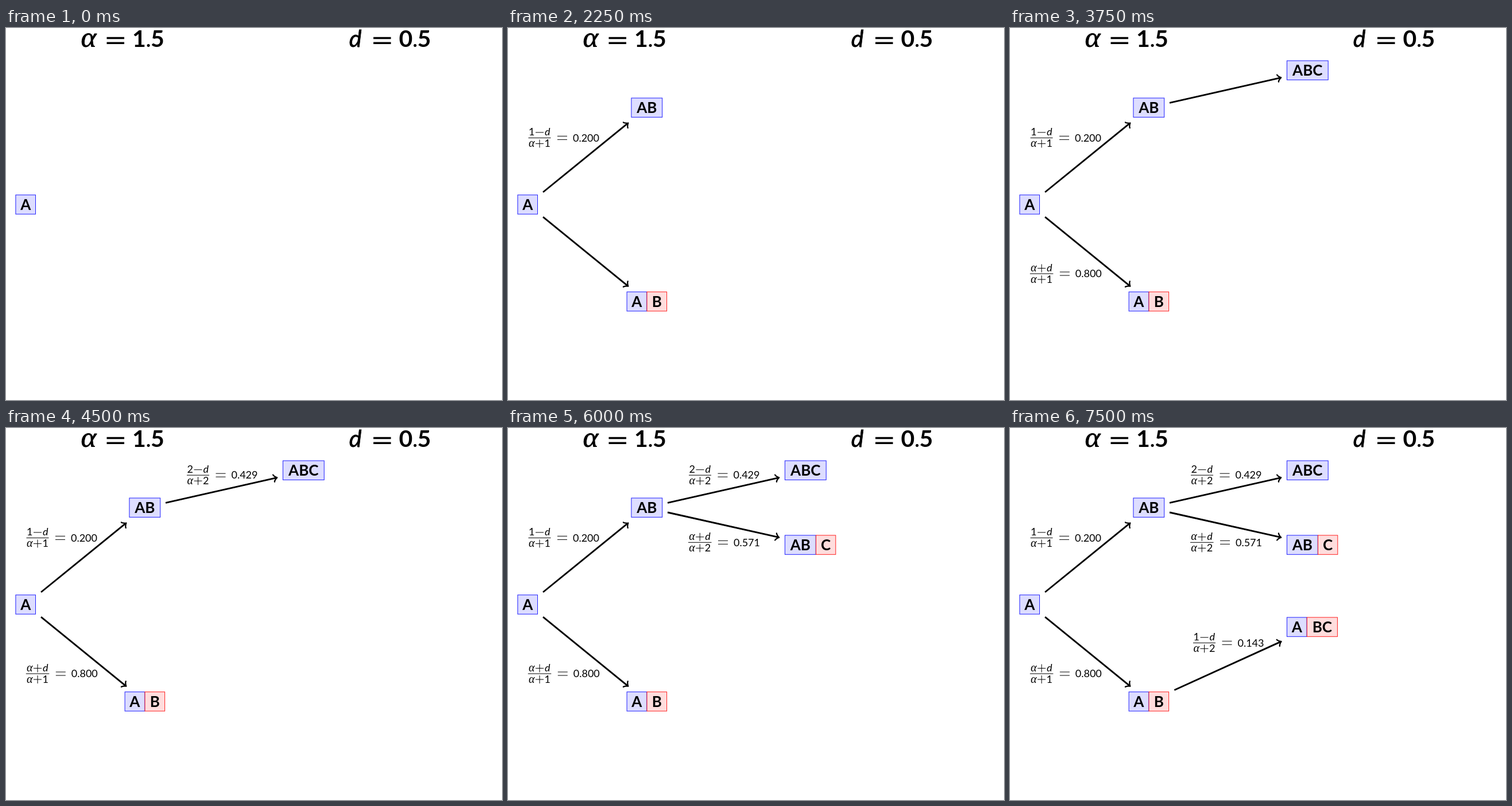
An HTML page that plays this animation: 864 by 648 pixels, repeating every 8000 ms.

```html
<!DOCTYPE html>
<html lang="en">
<head>
<meta charset="utf-8">
<title>Partition tree</title>
<style>
  html, body { margin: 0; width: 100%; height: 100%; overflow: hidden; background: #fff; }
  svg { display: block; width: 100vw; height: 100vh; }
  text { font-family: Lato, sans-serif; text-anchor: middle; font-kerning: none; }
  .title { font-size: 41px; }
  .node { font-size: 26px; }
  .label { font-size: 18px; }
  .bold { font-weight: 700; }
  .d { font-style: italic; }
  .alpha { font-family: "Liberation Serif", serif; font-style: italic; }
  .title.alpha { font-size: 51px; }
  .title.alpha, .title.d { stroke: #000; stroke-width: 0.8px; }
  .label.alpha { font-size: 20px; }
  .line { fill: none; stroke: #000; }
</style>
</head>
<body>
<svg id="stage" viewBox="0 0 864 648"></svg>
<script>
const LOOP = 8000, STEP = 750;
const BLUE = ["#ddddff", "#2020ff"], RED = ["#ffdddd", "#ff2020"];
const LETTER_BOX = { A: 34.6, B: 34.6, C: 34.3, AB: 53.8, BC: 53.1, ABC: 71.8 };
const stage = document.getElementById("stage");

function add(parent, tag, attrs, content = "") {
  const el = document.createElementNS("http://www.w3.org/2000/svg", tag);
  for (const key in attrs) el.setAttribute(key, attrs[key]);
  el.textContent = content;
  parent.append(el);
  return el;
}

const write = (g, x, y, string, style) => add(g, "text", { x, y, class: style }, string);
const stroke = (g, d, width) => add(g, "path", { d, class: "line", "stroke-width": width });

function symbol(g, x, y, char, style) {
  const extra = { "α": " alpha", d: " d" }[char] || "";
  write(g, x, y, char, style + extra);
}

function title(g, x, eq, char, digits) {
  symbol(g, x, 33, char, "title");
  stroke(g, `M${eq} 17.5h30.5M${eq} 26.3h30.5`, 3.6);
  const first = eq + 56.5;
  write(g, first, 33.3, digits[0], "title bold");
  write(g, first + 16, 33.3, ".", "title");
  write(g, first + 32, 33.3, digits[1], "title bold");
}

// Boxes sit side by side from x; the first is blue, the second red.
function node(g, x, cy, ...words) {
  words.forEach((word, i) => {
    const [fill, edge] = i ? RED : BLUE, width = LETTER_BOX[word];
    add(g, "rect", { x, y: cy - 16.7, width, height: 33.4, fill, stroke: edge, "stroke-width": 1 });
    write(g, x + width / 2, cy + 9.5, word, "node bold");
    x += width + 0.3;
  });
}

function arrow(g, x1, y1, x2, y2) {
  const a = 1.55, length = Math.hypot(x2 - x1, y2 - y1);
  const angle = Math.atan2(y2 - y1, x2 - x1) * 180 / Math.PI;
  const shaft = add(g, "g", { transform: `translate(${x1} ${y1}) rotate(${angle})` });
  stroke(shaft, `M0 0H${length - a}`, 2.85);
  const head = add(shaft, "g", { transform: `translate(${length - 2} 0) scale(${a})` });
  add(head, "path", {
    d: "M-3 -4C-2.75 -2.5 0 -.25 .75 0C0 .25 -2.75 2.5 -3 4",
    class: "line", "stroke-width": 1.5, "stroke-linecap": "round", "stroke-linejoin": "round"
  });
}

function row(g, cx, y, [left, sign, right]) {
  symbol(g, cx - 13.7, y, left, "label");
  stroke(g, `M${cx - 7} ${y - 5.5}h14` + (sign === "+" ? `M${cx} ${y - 12.5}v14` : ""), 1);
  symbol(g, cx + 13.7, y, right, "label");
}

function label(g, x, y, top, bottom, value) {
  const width = top[0] === "α" ? 40.5 : 39;
  const end = x + width, cx = x + width / 2;
  row(g, cx, y - 4, top);
  stroke(g, `M${x} ${y}H${end}`, 1);
  row(g, cx, y + 15.5, bottom);
  stroke(g, `M${end + 11.5} ${y - 3}h17M${end + 11.5} ${y + 3}h17`, 1);
  write(g, end + 61.5, y + 6.2, value, "label");
}

const scenes = [
  g => {
    title(g, 144, 175.5, "α", "15");
    title(g, 608.5, 640, "d", "05");
    node(g, 16.9, 307.5, "A");
  },
  g => { arrow(g, 61, 286, 210, 165); node(g, 214.9, 138.7, "AB"); },
  g => label(g, 35.5, 191.4, "1−d", "α+1", "0.200"),
  g => { arrow(g, 61, 329.2, 210, 450.3); node(g, 207.1, 476.4, "A", "B"); },
  g => label(g, 34.8, 428, "α+d", "α+1", "0.800"),
  g => { arrow(g, 278, 130.4, 473, 86.2); node(g, 482.4, 73.7, "ABC"); },
  g => label(g, 315, 82.2, "2−d", "α+2", "0.429"),
  g => { arrow(g, 278, 147, 473, 190.8); node(g, 482.4, 203.6, "AB", "C"); },
  g => label(g, 314, 199.3, "α+d", "α+2", "0.571"),
  g => { arrow(g, 286.3, 456.5, 473.3, 371.5); node(g, 482.4, 346.6, "A", "BC"); },
  g => label(g, 319, 374.3, "1−d", "α+2", "0.143")
];

const groups = scenes.map(draw => {
  const g = add(stage, "g", {});
  draw(g);
  return g;
});

const start = performance.now();
function show() {
  const time = (performance.now() - start) % LOOP;
  groups.forEach((g, i) => g.setAttribute("visibility", time >= i * STEP ? "visible" : "hidden"));
  requestAnimationFrame(show);
}
show();
</script>
</body>
</html>
```
